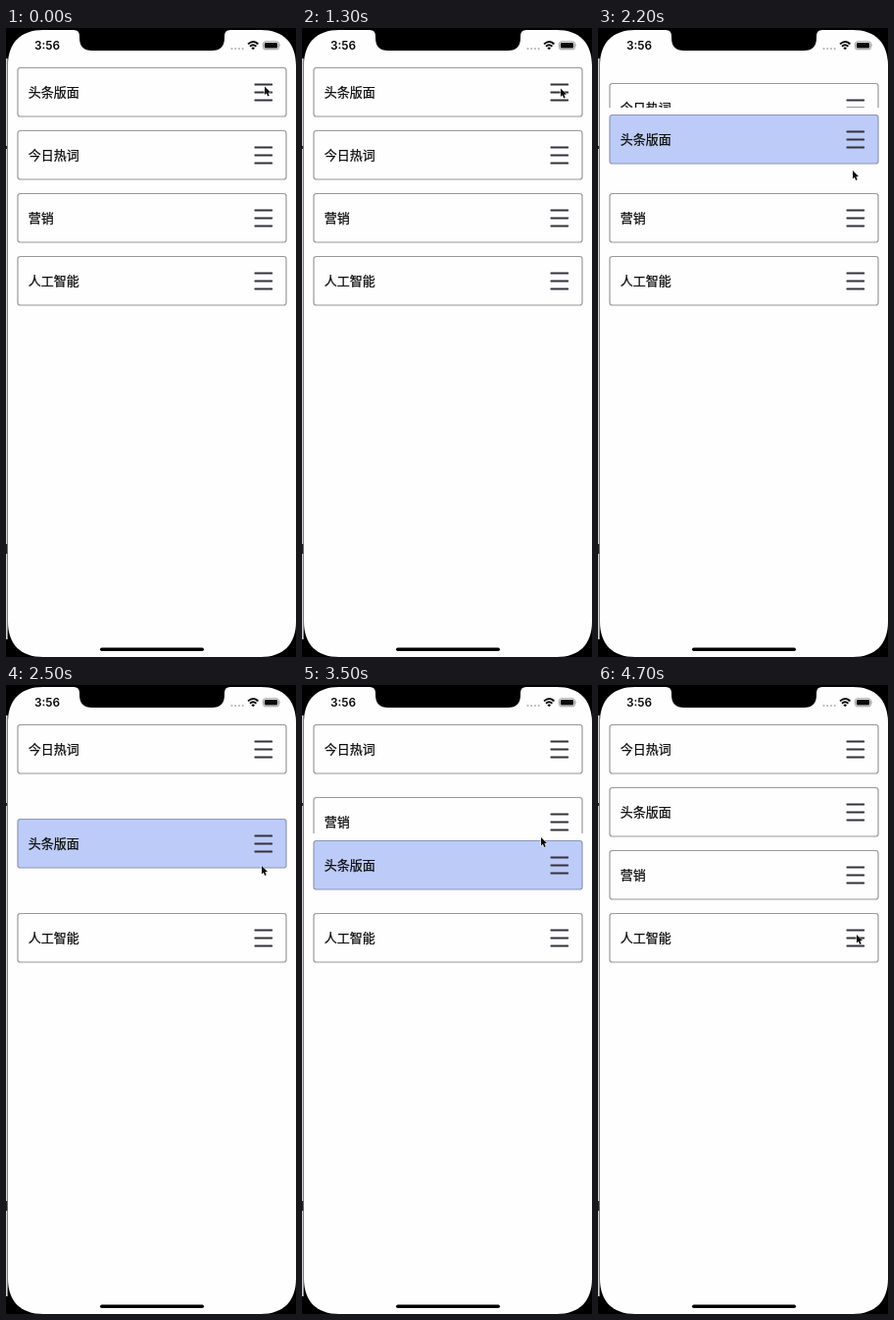
Animation, 296 px wide and 640 px high, one loop 5000 ms. Source, as an HTML page:

```html
<!DOCTYPE html>
<html lang="zh-CN">
<head>
<meta charset="utf-8">
<title>拖动排序</title>
<style>
  html, body { margin: 0; width: 100%; height: 100%; overflow: hidden; background: #000; }
  svg { display: block; width: 296px; height: 640px; }
  .label { font: 500 13px "Noto Sans CJK SC", "Noto Sans CJK", sans-serif; fill: #0c0c0c; stroke: #0c0c0c; stroke-width: .25; }
  .clock { font: 600 11.8px Inter, sans-serif; fill: #0a0a0a; }
  .card { fill: #fefefe; stroke: #98989b; stroke-width: 1.2; }
  .held .card { fill: #bdcbf9; stroke: #8e96b4; }
  .bars { stroke: #333338; stroke-width: 1.8; stroke-linecap: round; }
</style>
</head>
<body>
<svg viewBox="0 0 296 640">
  <rect width="296" height="640" fill="#000"/>
  <!-- left bezel -->
  <rect y="31" width="1" height="591" fill="#d4d4d4"/>
  <rect x="1" y="31" width="1" height="591" fill="#808084"/>
  <rect y="120" width="1" height="3" fill="#222"/>
  <rect y="525" width="1.2" height="10" fill="#222"/>
  <!-- screen with notch -->
  <path fill="#fefefe" d="M38 2H69Q75 2 75 8V10Q75 23 88 23H210Q223 23 223 10V8Q223 2 229 2H260C283 2 296 15 296 38V604C296 627 283 640 260 640H38C15 640 2 627 2 604V38C2 15 15 2 38 2Z"/>
  <text class="clock" x="29" y="22">3:56</text>
  <g fill="#b4b4b6">
    <circle cx="230.5" cy="21" r="1.1"/><circle cx="234.2" cy="21" r="1.1"/>
    <circle cx="237.9" cy="21" r="1.1"/><circle cx="241.6" cy="21" r="1.1"/>
  </g>
  <g fill="none" stroke="#0a0a0a" stroke-width="1.9">
    <path d="M247 16.4Q252.2 11.8 257.4 16.4"/>
    <path d="M249 18.7Q252.2 15.9 255.4 18.7"/>
  </g>
  <path d="M250.3 20.2Q252.2 18.7 254.1 20.2L252.2 22.2Z" fill="#0a0a0a"/>
  <rect x="262.5" y="13.8" width="16" height="8" rx="2.3" fill="none" stroke="#8c8c8e" stroke-width=".9"/>
  <rect x="263.8" y="15.1" width="13.4" height="5.4" rx="1.3" fill="#0a0a0a"/>
  <path d="M279.6 16.3Q281 17.8 279.6 19.3Z" fill="#8c8c8e"/>
  <g id="list"></g>
  <rect x="96" y="630.5" width="106" height="3.6" rx="1.8" fill="#000"/>
  <path id="pointer" d="M0 0V8.4L1.9 6.8L3.2 9.9L4.7 9.3L3.4 6.3L6 6.1Z" fill="#0a0a0a" stroke="#fff" stroke-width=".9" paint-order="stroke"/>
</svg>
<script>
  const LOOP = 5000, TICK = 100, TOP = 40, ROW = 64, SWAP = 130;
  const HOLD = [1400, 3600];

  // pointer path: time, x, y
  const path = [
    [0, 264, 59.5], [200, 264, 59.5], [400, 264, 61.5], [1700, 264, 61.5],
    [1900, 263, 68], [2100, 261, 108], [2200, 260, 145], [2300, 260, 152],
    [2400, 261, 163], [2500, 261, 184], [2600, 261, 191], [2700, 261, 190],
    [3000, 259, 190], [3400, 247, 164], [3500, 244, 155], [3900, 244, 155],
    [4200, 249, 190], [4400, 256, 238], [4500, 258, 250], [4700, 264, 254], [5000, 264, 254]
  ];

  // each row: label, first slot, moves as [start, slot change]
  const rows = [
    { text: '今日热词', slot: 1, moves: [[2112, -1]] },
    { text: '营销', slot: 2, moves: [[2435, -1], [3468, 1]] },
    { text: '人工智能', slot: 3, moves: [] },
    { text: '头条版面', slot: 0, moves: [[2112, 1], [2435, 1], [3468, -1]] }
  ];

  const list = document.getElementById('list');
  const pointer = document.getElementById('pointer');

  for (const row of rows) {
    row.el = document.createElementNS('http://www.w3.org/2000/svg', 'g');
    row.el.innerHTML = `
      <rect x="3" y="-7" width="292" height="64" fill="#fefefe"/>
      <rect class="card" x="12" y=".5" width="274" height="49.5" rx="2.5"/>
      <text class="label" x="22.7" y="30">${row.text}</text>
      <path class="bars" d="M254.3 17.5H271.3M254.3 25.5H271.3M254.3 33.5H271.3"/>`;
    list.append(row.el);
  }
  const dragged = rows[3].el;

  const ease = u => {
    u = Math.min(1, Math.max(0, u));
    return u * u * (3 - 2 * u);
  };

  function rowY(row, t) {
    const slot = row.moves.reduce((s, [at, d]) => s + d * ease((t - at) / SWAP), row.slot);
    return Math.round(TOP + ROW * slot);
  }

  function pointerAt(t) {
    const i = path.findIndex(p => p[0] > t);
    const [t0, x0, y0] = path[i - 1], [t1, x1, y1] = path[i];
    const u = (t - t0) / (t1 - t0);
    return [x0 + (x1 - x0) * u, y0 + (y1 - y0) * u];
  }

  function draw(t) {
    for (const row of rows) row.el.setAttribute('transform', `translate(0 ${rowY(row, t)})`);
    dragged.setAttribute('class', t >= HOLD[0] && t < HOLD[1] ? 'held' : '');
    pointer.setAttribute('transform', `translate(${pointerAt(t)})`);
  }

  const start = performance.now();
  function frame() {
    const t = (performance.now() - start) % LOOP;
    draw(Math.floor(t / TICK) * TICK);
    requestAnimationFrame(frame);
  }
  frame();
</script>
</body>
</html>
```
